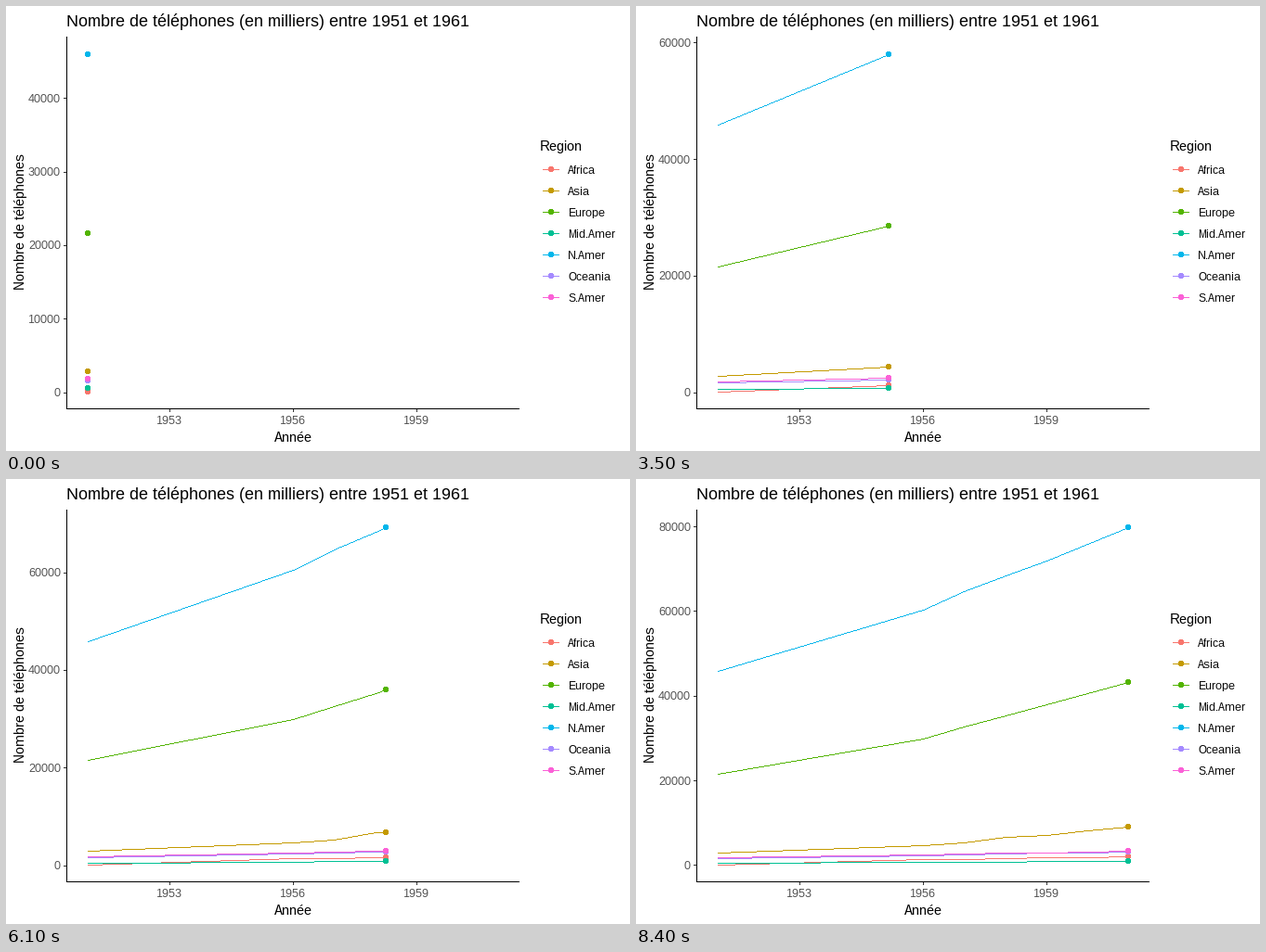
Recreate the animation shown at these times as a matplotlib script. Size 672 by 480 pixels, loop 10 s.

```python
import numpy as np
import matplotlib.pyplot as plt
from matplotlib.animation import FuncAnimation

plt.rcParams.update({"font.family": "Liberation Sans", "path.simplify": False,
                     "text.hinting": "native", "text.hinting_factor": 1})

PX = 0.75  # points per pixel at 96 dpi
LEFT, RIGHT, TOP, BOTTOM = 65.4, 552.6, 33.7, 434.3
GREY_TICK, GREY_TEXT = "#333333", "#4D4D4D"

YEARS = np.array([1951, *range(1956, 1962)])
KEY_FRAMES = np.round((YEARS - 1951) * 8.4)


def phones(start, middle, end, swing=0, cycles=1):
    """Two straight trends meeting in 1956, with a fading swing afterwards."""
    t = np.clip(YEARS - 1956, 0, 5) / 5
    trend = np.interp(YEARS, [1951, 1956, 1961], [start, middle, end])
    return trend + swing * np.sin(2 * np.pi * cycles * t) * (1 - t)


REGIONS = {
    "Africa": ("#F8766D", phones(89, 1411, 2005)),
    "Asia": ("#C49A00", phones(2876, 4708, 9053, -550, 2)),
    "Europe": ("#53B400", phones(21574, 29990, 43173)),
    "Mid.Amer": ("#00C094", phones(555, 733, 1076)),
    "N.Amer": ("#00B6EB", phones(45939, 60423, 79831, 500)),
    "Oceania": ("#A58AFF", phones(1646, 2366, 3224)),
    "S.Amer": ("#FB61D7", phones(1815, 2568, 3338)),
}
LOW = REGIONS["Africa"][1][0]

fig = plt.figure(figsize=(7, 5), dpi=96, facecolor="white")
ax = fig.add_axes([0, 0, 1, 1])
ax.set(xlim=(0, 672), ylim=(480, 0))
ax.axis("off")


def nearest(v):
    return np.floor(np.asarray(v, float) + 0.5)


def line(color, xs=(), ys=(), z=1):
    return ax.plot(xs, ys, color=color, lw=PX, snap=False, zorder=z,
                   solid_capstyle="butt")[0]


def runs(x0, x1, rows):
    """One-pixel-high horizontal strokes that fill whole pixels."""
    gap = np.full(len(rows), np.nan)
    mid = np.asarray(rows) + 0.5
    return (np.column_stack([x0, x1, gap]).ravel(),
            np.column_stack([mid, mid, gap]).ravel())


def trail(xs, ys):
    cols = np.arange(xs[0], xs[-1] + 1)
    return runs(cols, cols + 1, nearest(np.interp(cols, xs, ys)))


def dot(x, y):
    rows = np.arange(-3, 3)
    half = np.where(np.abs(rows + 0.5) > 2, 2, 3)
    return runs(x - half, x + half, y + rows)


def text(x, y, s, size, color="black", **kw):
    return ax.text(x, y, s, fontsize=size * PX, color=color,
                   va="baseline", **kw)


def x_pos(year):
    return LEFT + (RIGHT - LEFT) * (np.asarray(year) - 1950.5) / 11


def y_pos(value, high):
    share = (np.asarray(value) - LOW) / (high - LOW)
    return BOTTOM - (BOTTOM - TOP) * (share + 0.05) / 1.1


# Titles and axes
text(65, 22, "Nombre de téléphones (en milliers) entre 1951 et 1961", 18)
text(309, 470, "Année", 15, ha="center")
text(20, 233, "Nombre de téléphones", 15, rotation=90,
     rotation_mode="anchor", ha="center")
line("black", [65.5, 65.5], [33, 435], 2)
line("black", [65, 553], [434.5, 434.5], 2)
for year in (1953, 1956, 1959):
    x = nearest(x_pos(year))
    line(GREY_TICK, [x + 0.5, x + 0.5], [435, 438])
    text(x, 451, str(year), 12, GREY_TEXT, ha="center")

# Legend
text(575, 156, "Region", 15)
for i, (name, (color, _)) in enumerate(REGIONS.items()):
    y = nearest(175.9 + 23.04 * i)
    line(color, [578, 596], [y + 0.5, y + 0.5])
    line(color, *dot(587, y))
    text(605, y + 5, name, 12)

# Moving parts
trails = {n: line(c, z=4) for n, (c, _) in REGIONS.items()}
heads = {n: line(c, z=5) for n, (c, _) in REGIONS.items()}
ticks = {v: (line(GREY_TICK),
             text(59, 0, str(v), 12, GREY_TEXT, ha="right"))
         for v in range(0, 80001, 10000)}


def update(frame):
    year = np.interp(frame, KEY_FRAMES, YEARS)
    shown = np.append(YEARS[YEARS < year], year)
    xs = nearest(x_pos(shown))
    high = np.interp(year, YEARS, REGIONS["N.Amer"][1])

    for name, (_, values) in REGIONS.items():
        ys = nearest(y_pos(np.interp(shown, YEARS, values), high))
        trails[name].set_data(*trail(xs, ys))
        heads[name].set_data(*dot(xs[-1], ys[-1]))

    step = 10000 if high < 52700 else 20000
    for value, (mark, label) in ticks.items():
        y = y_pos(value, high)
        visible = bool(value % step == 0 and y >= TOP)
        mark.set_data([62, 65], [nearest(y) + 0.5] * 2)
        label.set_y(np.floor(y) + 5)
        mark.set_visible(visible)
        label.set_visible(visible)
    return []


anim = FuncAnimation(fig, update, frames=100, interval=100,
                     repeat=True, repeat_delay=0, blit=False)
plt.show()
```
